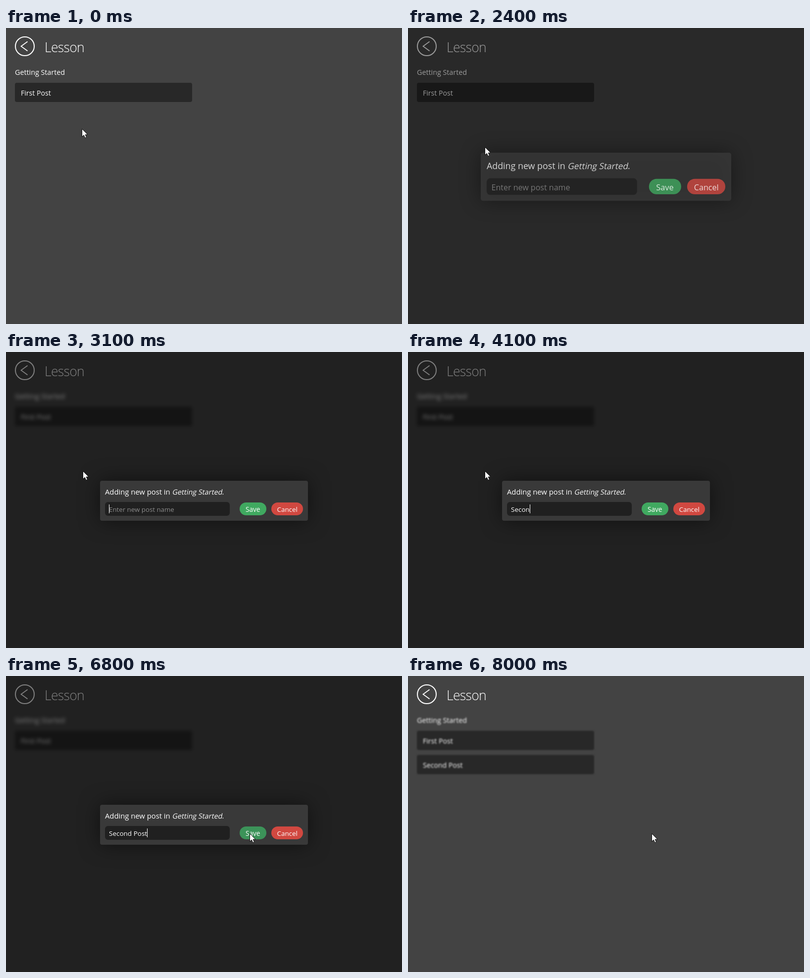
An HTML page with a canvas that plays this animation: 800x600 px, repeating every 8500 ms.

```html
<!DOCTYPE html>
<html lang="en">
<head>
<meta charset="utf-8">
<title>Lesson</title>
<style>
  html, body { margin: 0; width: 100%; height: 100%; overflow: hidden; background: #434343; }
  canvas { display: block; }
</style>
</head>
<body>
<canvas id="stage" width="800" height="600"></canvas>
<script>
const ctx = document.getElementById('stage').getContext('2d');
const LOOP = 8500, STEP = 100;
const FAMILY = '"Open Sans", "Noto Sans", sans-serif';
const NAME = 'Second Post';
const KEY_TIMES = [3400, 3500, 3700, 3900, 4100, 4200, 4300, 4600, 4800, 5000, 5200];
// pointer path: time, x, y
const POINTER = [
  [1350, 154, 205], [1800, 156, 238], [1900, 156, 242],
  [5850, 156, 242], [6700, 493, 320]
];

const clamp = v => Math.min(1, Math.max(0, v));
const span = (t, from, to) => clamp((t - from) / (to - from));
const easeInOut = u => u < 0.5 ? 2 * u * u : 1 - 2 * (1 - u) * (1 - u);
const backOut = u => 1 + 2.2 * (u - 1) ** 3 + 1.2 * (u - 1) ** 2;
const ramp = (t, from, to) => easeInOut(span(t, from, to));

function box(x, y, w, h, r, fill) {
  ctx.fillStyle = fill;
  ctx.beginPath();
  ctx.roundRect(x, y, w, h, r);
  ctx.fill();
}

function disc(x, y, r, fill) {
  ctx.fillStyle = fill;
  ctx.beginPath();
  ctx.arc(x, y, r, 0, 2 * Math.PI);
  ctx.fill();
}

function line(width, ...points) {
  ctx.strokeStyle = '#fff';
  ctx.lineWidth = width;
  ctx.beginPath();
  points.forEach(([x, y]) => ctx.lineTo(x, y));
  ctx.stroke();
}

function text(str, x, y, size, fill = '#fff', weight = 400) {
  ctx.font = `${weight} ${size}px ${FAMILY}`;
  ctx.fillStyle = fill;
  ctx.fillText(str, x, y);
}

function oblique(str, x, y, size) {
  ctx.save();
  ctx.translate(x, y);
  ctx.transform(1, 0, -0.2, 1, 0, 0);
  text(str, 0, 0, size);
  ctx.restore();
}

function scaleAbout(x, y, s) {
  ctx.translate(x, y);
  ctx.scale(s, s);
  ctx.translate(-x, -y);
}

function shade(alpha) {
  ctx.fillStyle = `rgba(0,0,0,${alpha})`;
  ctx.fillRect(0, 0, 800, 600);
}

function pointerAt(t) {
  let prev = POINTER[0];
  if (t <= prev[0]) return { x: prev[1], y: prev[2] };
  for (const next of POINTER) {
    if (t < next[0]) {
      const u = ramp(t, prev[0], next[0]);
      return { x: prev[1] + (next[1] - prev[1]) * u, y: prev[2] + (next[2] - prev[2]) * u };
    }
    prev = next;
  }
  return { x: prev[1], y: prev[2] };
}

function header() {
  ctx.strokeStyle = '#fff';
  ctx.lineWidth = 2;
  ctx.beginPath();
  ctx.arc(38, 37, 19, 0, 2 * Math.PI);
  ctx.stroke();
  line(1.8, [43.5, 27.5], [30.5, 37], [43.5, 46.5]);
  ctx.letterSpacing = '-0.7px';
  text('Lesson', 78, 49, 26.6, '#fff', 300);
  ctx.letterSpacing = '0px';
}

function list(t) {
  const blur = 3.5 * (ramp(t, 2050, 3100) - ramp(t, 7550, 8400));
  const posts = t >= 7600 ? ['First Post', NAME] : ['First Post'];
  ctx.save();
  if (blur > 0 && t < 8500) ctx.filter = `blur(${blur}px)`;
  text('Getting Started', 18, 95, 14.3);
  posts.forEach((post, i) => {
    box(18, 111 + 49 * i, 358, 39, 4, '#282828');
    text(post, 30, 137 + 49 * i, 14.1);
  });
  ctx.restore();
}

function pencil(x, y) {
  ctx.save();
  ctx.translate(x, y);
  ctx.rotate(-Math.PI / 4);
  ctx.fillStyle = '#fff';
  ctx.beginPath();
  ctx.moveTo(-12.5, 0);
  ctx.lineTo(-7, -3.3);
  ctx.lineTo(6, -3.3);
  ctx.lineTo(6, 3.3);
  ctx.lineTo(-7, 3.3);
  ctx.fill();
  box(7.3, -3.3, 4.4, 6.6, [0, 1.5, 1.5, 0], '#fff');
  ctx.restore();
}

function menu(t, pointer) {
  const size = backOut(span(t, 950, 1400)) * (1 - ramp(t, 1850, 2150));
  if (t < 950 || size <= 0.01) return;
  const y = 242;
  ctx.save();
  ctx.globalAlpha = clamp(size * 1.5);
  scaleAbout(225, y, size);
  box(131, 222, 188, 40, 20, '#9565b9');
  if (Math.hypot(pointer.x - 151, pointer.y - y) < 17) disc(151, y, 17, '#8457a5');
  line(2, [142, y], [160, y]);
  line(2, [151, y - 9], [151, y + 9]);
  line(1.5, [193.5, y - 11], [183, y], [193.5, y + 11]);
  line(1.5, [219.5, y - 11], [230, y], [219.5, y + 11]);
  line(1.8, [254, y - 8], [270, y + 8]);
  line(1.8, [270, y - 8], [254, y + 8]);
  pencil(299, y);
  ctx.restore();
}

function field(t) {
  const typed = NAME.slice(0, KEY_TIMES.filter(k => k <= t).length);
  box(200, 304, 252, 28, 6, '#202020');
  if (typed) text(typed, 208, 324, 13.5);
  else text('Enter new post name', 208, 324, 13.3, '#8c8c8c');
  const caret = t >= 2900 && t < 7200 && !(t >= 6300 && t < 6800);
  if (!caret) return;
  ctx.font = `400 13.5px ${FAMILY}`;
  ctx.fillStyle = '#fff';
  ctx.fillRect(Math.round(208 + ctx.measureText(typed).width), 309, 1, 18);
}

function dialog(t, pointer, shown, gone) {
  const alpha = shown * (1 - gone);
  if (alpha <= 0) return;
  const hover = pointer.x > 472 && pointer.x < 526 && pointer.y > 305 && pointer.y < 331;
  ctx.save();
  ctx.globalAlpha = alpha;
  scaleAbout(400, 301.5, 2 - shown - 0.12 * gone);
  ctx.shadowColor = 'rgba(0,0,0,0.5)';
  ctx.shadowBlur = 40;
  box(190, 261, 420, 81, 4, '#393939');
  ctx.shadowColor = 'transparent';
  text('Adding new post in', 200, 289, 14.8);
  oblique('Getting Started', 335.5, 289, 14.3);
  text('.', 436.5, 289, 14.3);
  field(t);
  box(472, 305, 54, 26, 13, hover ? '#3c9359' : '#40a960');
  text('Save', 484, 324, 13.6);
  box(536, 305, 64, 26, 13, '#d14840');
  text('Cancel', 547.5, 324, 13.4);
  ctx.restore();
}

function spinner(t, alpha) {
  ctx.save();
  ctx.globalAlpha = alpha;
  const lead = (t - 7200) / 1458;
  [3.7, 2.8, 2, 1.3, 0.8].forEach((r, i) => {
    const u = lead - i * 0.0415;
    if (u < 0) return;
    const a = 2 * Math.PI * easeInOut(u % 1);
    disc(400 + 31 * Math.sin(a), 281 - 31 * Math.cos(a), r, '#fff');
  });
  ctx.restore();
}

function arrow({ x, y }) {
  ctx.save();
  ctx.translate(Math.round(x) - 0.5, Math.round(y) - 0.5);
  ctx.beginPath();
  [[0, 0], [0, 16], [3.7, 12.6], [6.3, 18.2], [9, 17], [6.6, 11.6], [11.5, 11.5]]
    .forEach(([px, py]) => ctx.lineTo(px, py));
  ctx.closePath();
  ctx.fillStyle = '#fff';
  ctx.fill();
  ctx.strokeStyle = '#111';
  ctx.lineWidth = 1;
  ctx.stroke();
  ctx.restore();
}

function draw(t) {
  const pointer = pointerAt(t);
  const shown = ramp(t, 1880, 2645);
  const gone = ramp(t, 7640, 7980);
  const busy = ramp(t, 7150, 7500) * (1 - gone);

  ctx.fillStyle = '#434343';
  ctx.fillRect(0, 0, 800, 600);
  header();
  list(Math.min(t, 8000)); // the list stays soft until the loop restarts
  menu(t, pointer);
  shade(0.5 * shown * (1 - gone));
  dialog(t, pointer, shown, gone);
  if (busy > 0) {
    shade(0.43 * busy);
    spinner(t, clamp(busy * 1.1));
  }
  arrow(pointer);
}

const start = performance.now();
function tick() {
  const t = (performance.now() - start) % LOOP;
  draw(Math.floor(t / STEP) * STEP);
  requestAnimationFrame(tick);
}
tick();
</script>
</body>
</html>
```
